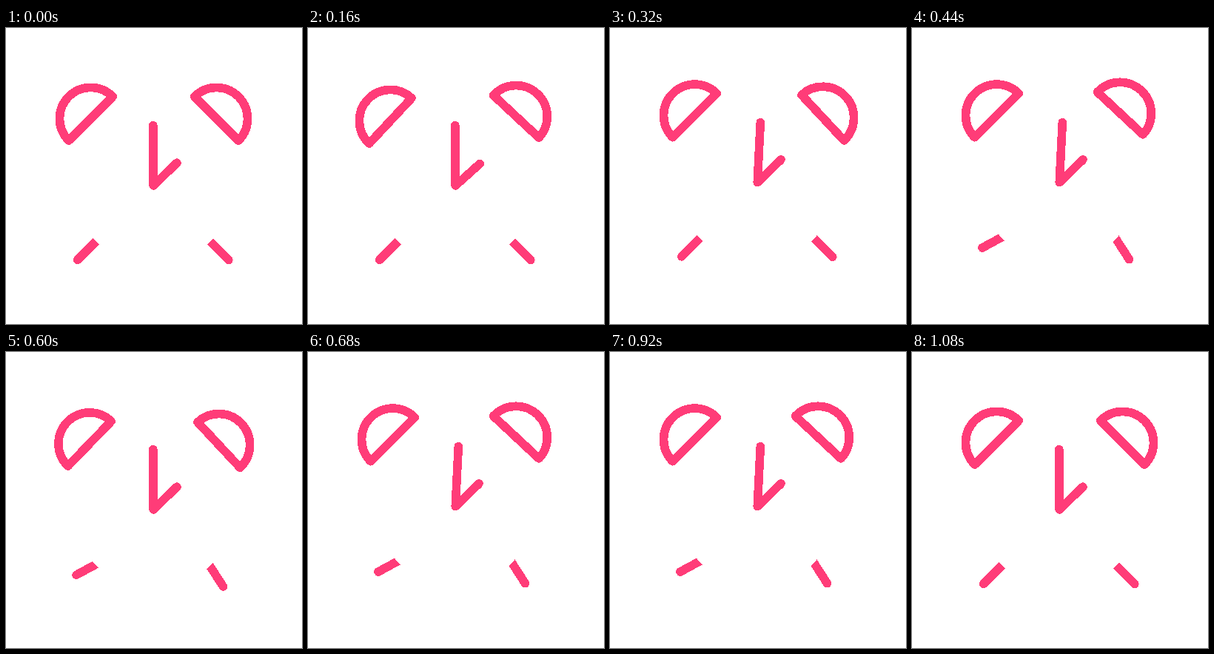
Recreate the animation shown at these times as an HTML page. Size 400 by 400 pixels, loop 1160 ms.

```html
<!DOCTYPE html>
<html lang="en">
<head>
<meta charset="utf-8">
<title>Ringing alarm clock</title>
<style>
  html, body { margin: 0; width: 100%; height: 100%; overflow: hidden; background: #fff; }
  svg { display: block; width: 100vw; height: 100vh; }
  .ink {
    fill: none; stroke: #ff3c78; stroke-width: 11.6;
    stroke-linecap: round; stroke-linejoin: round; shape-rendering: crispEdges;
  }
</style>
</head>
<body>
<svg viewBox="0 0 400 400">
  <g id="clock" class="ink">
    <path id="leftLeg"/>
    <path id="rightLeg"/>
    <circle cx="199" cy="213" r="108" fill="#fff" stroke="none"/>
    <path id="leftBell" d="M144.2 92.7 A42 42 0 0 0 84.8 152.1 Z"/>
    <path id="rightBell" d="M254.8 92.8 A42 42 0 0 1 314.2 152.2 Z"/>
    <path id="minute" d="M199.2 213 L198.8 131.7"/>
    <path id="hour" d="M199.2 213 L231 182.2"/>
  </g>
</svg>
<script>
const LOOP = 1160, STEP = 40, LAST = 27;
const part = Object.fromEntries(
  [...document.querySelectorAll('[id]')].map(el => [el.id, el]));

// Rhythms, one entry per step.
const rhythm = {
  lift: [0, 0, -4.3],
  minute: [0, 0, 3.2],
  hour: [0, 2.3, 0],
  leftBell: [0, 0, 0, -1, -2, 0],
  rightBell: [-2, 2, 2, 2, -2, -2]
};

const legs = [
  { leftLeg: 'M130 280 L96.8 313.2', rightLeg: 'M267.3 280 L300.8 313.5' },
  { leftLeg: 'M131 281.8 L95 301.3', rightLeg: 'M269 279 L293.5 317' }
];

function draw(time) {
  const step = Math.min(LAST, Math.floor((time % LOOP) / STEP));
  const resting = step === 0 || step === LAST;
  const beat = name => resting ? 0 : rhythm[name][step % rhythm[name].length];

  part.clock.setAttribute('transform', `translate(0 ${beat('lift')})`);
  for (const name of ['minute', 'hour', 'leftBell', 'rightBell'])
    part[name].setAttribute('transform', `rotate(${beat(name)} 199 213)`);

  const pose = legs[resting ? 0 : step % 2];
  for (const name in pose) part[name].setAttribute('d', pose[name]);
}

const start = performance.now();
function frame() {
  draw(performance.now() - start);
  requestAnimationFrame(frame);
}
frame();
</script>
</body>
</html>
```
